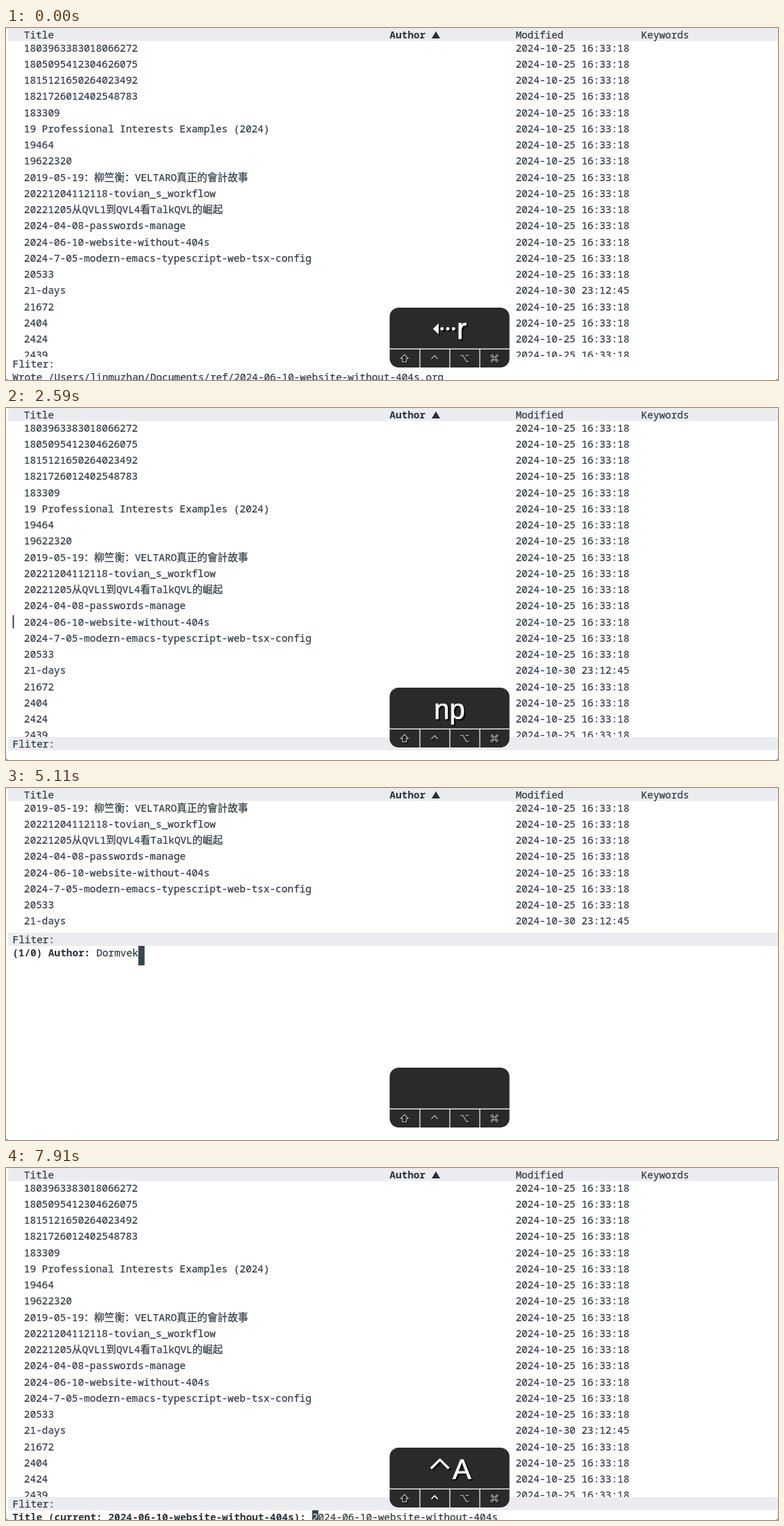
Write an HTML page that moves like this. It is 1108 by 506 pixels and loops after 8000 ms.

```html
<!DOCTYPE html>
<html lang="en">
<head>
<meta charset="utf-8">
<title>Reference list</title>
<style>
  html, body { margin: 0; width: 100%; height: 100%; overflow: hidden; background: #fff; }
  svg { display: block; width: 100vw; height: 100vh; }
  text { font: 14.34px "Noto Sans Mono", monospace; fill: #333e44; stroke: #333e44; stroke-width: .25; white-space: pre; }
  .cjk { font: 14.63px "Noto Sans CJK SC", "Noto Sans CJK", sans-serif; }
  .bold { font-weight: 700; fill: #263238; stroke: none; }
  .bar { fill: #ebecf0; }
  .block { fill: #37474f; }
  .line { fill: none; stroke-linejoin: round; }
  #keys text { font: 40px "Liberation Sans", Arial, sans-serif; fill: #fff; stroke: #fff; stroke-width: .7; }
  #keys { filter: drop-shadow(2px 2px 0.6px #000); }
  #mods { stroke: #a2a2a2; stroke-width: 1.5; filter: drop-shadow(1px 1px 0.4px #000); }
</style>
</head>
<body>
<svg id="stage" viewBox="0 0 1108 506" preserveAspectRatio="none"></svg>
<script>
const LOOP = 8000, CELL = 8.604, ROW = 23.25, LEFT = 9.2;
const COLUMNS = { title: 25.8, author: 550.6, modified: 731.4, keywords: 911.7 };
const stage = document.getElementById('stage');

function add(parent, tag, attrs = {}) {
  const el = document.createElementNS('http://www.w3.org/2000/svg', tag);
  for (const name in attrs) el.setAttribute(name, attrs[name]);
  return parent.appendChild(el);
}
const group = (parent, attrs) => add(parent, 'g', attrs);
const rect = (parent, x, y, width, height, attrs) =>
  add(parent, 'rect', { x, y, width, height, ...attrs });
const path = (parent, d, attrs) => add(parent, 'path', { d, ...attrs });

// Chinese runs get their own, slightly larger face.
function text(parent, x, y, str, attrs) {
  const el = add(parent, 'text', { x, y, ...attrs });
  for (const run of str.split(/([\u3000-\u9fff\uff00-\uffef]+)/)) {
    if (!run) continue;
    const span = add(el, 'tspan', run.charCodeAt(0) > 0x2fff ? { class: 'cjk' } : {});
    span.textContent = run;
  }
  return el;
}

// Looped square, also used large in the key display.
function command(parent, x, y, size, width) {
  const loop = (sx, sy) =>
    `M${sx * .4} ${sy * .4}H${sx * .7}A.3 .3 0 1 ${sx * sy > 0 ? 1 : 0} ${sx * .4} ${sy * .7}Z`;
  const d = 'M-.4-.4H.4V.4H-.4Z' + loop(1, 1) + loop(1, -1) + loop(-1, 1) + loop(-1, -1);
  return path(parent, d, {
    class: 'line', transform: `translate(${x} ${y}) scale(${size})`,
    'stroke-width': width / size
  });
}

// File list
const titles = [
  '1803963383018066272', '1805095412304626075', '1815121650264023492',
  '1821726012402548783', '183309', '19 Professional Interests Examples (2024)',
  '19464', '19622320', '2019-05-19：柳竺衡：VELTARO真正的會計故事',
  '20221204112118-tovian_s_workflow', '20221205从QVL1到QVL4看TalkQVL的崛起',
  '2024-04-08-passwords-manage', '2024-06-10-website-without-404s',
  '2024-7-05-modern-emacs-typescript-web-tsx-config', '20533', '21-days',
  '21672', '2404', '2424', '2439'
];
const list = group(stage);
titles.forEach((title, i) => {
  const y = 33.5 + i * ROW;
  text(list, COLUMNS.title, y, title);
  text(list, COLUMNS.modified, y, title === '21-days' ? '2024-10-30 23:12:45' : '2024-10-25 16:33:18');
});
const point = rect(stage, 9.5, 298, 2, 18.6, { class: 'block' });

// Header
rect(stage, 0, 0, 1108, 19, { fill: '#fff' });
rect(stage, 3, 0, 1105, 18.6, { class: 'bar' });
text(stage, COLUMNS.title, 14.5, 'Title');
text(stage, COLUMNS.author, 14.5, 'Author', { class: 'bold' });
path(stage, 'M611 15L617 4.8L623 15Z', { fill: '#263238' });
text(stage, COLUMNS.modified, 14.5, 'Modified');
text(stage, COLUMNS.keywords, 14.5, 'Keywords');

// Mode line and everything below it
const lower = group(stage);
rect(lower, 0, 0, 1108, 300, { fill: '#fff' });
const modeBar = rect(lower, 3, 0, 1105, 19, { class: 'bar' });
text(lower, LEFT + .4, 14.8, 'Fliter:');

// Minibuffers
const file = '2024-06-10-website-without-404s';
const wrote = text(stage, LEFT, 507, `Wrote /Users/linmuzhan/Documents/ref/${file}.org`);

const author = group(stage);
const prompt = text(author, LEFT, 242, '(1/9) Author:', { class: 'bold' });
const pasted = text(author, LEFT + 14 * CELL, 242, 'Dormvek');
const choices = group(author);
rect(choices, 9, 255, 111.4, 27.4, { class: 'bar' });
['奥尔文·泰洛科德', '岫禾传媒', '参考答案', 'Wendro', '邱屿澜', 'NoelTarby',
  'AndersVelmund', '问岚', '澄石桥杂志社'
].forEach((name, i) => text(choices, LEFT, 269.4 + i * 27.52, name));

const rename = group(stage);
text(rename, LEFT, 507, `Title (current: ${file}):`, { class: 'bold' });
text(rename, LEFT + 50 * CELL, 507, file);

const caret = rect(stage, 0, 0, 9, 28, { class: 'block' });
const under = text(stage, LEFT + 50 * CELL, 507, '2', { style: 'fill:#fff;stroke:none' });

// Rounded window corners
path(stage, 'M0 503Q.4 505.6 3 506H0ZM1108 503Q1107.6 505.6 1105 506H1108Z', { fill: '#777' });

// Key display
rect(stage, 550.6, 402, 172, 86, { rx: 13, fill: '#2a2a2a' });
path(stage, 'M550.6 461.4H722.6M594 461.4V488M637 461.4V488M680 461.4V488',
  { stroke: '#fff', 'stroke-width': 1.2 });

const mods = group(stage, { id: 'mods' });
path(mods, 'M572 469.4L577.6 475.2H574.8V480H569.2V475.2H566.4Z', { class: 'line' });
const ctrl = path(mods, 'M610.6 476L615.2 471.2L619.8 476', { class: 'line', 'stroke-width': 1.8 });
path(mods, 'M652.4 470.8H656L661 479.4H664.4M659.6 470.8H664.4', { class: 'line' });
const cmd = command(mods, 701.2, 475, 5, 1.3);

const keys = group(stage, { id: 'keys' });
const caps = {};
const cap = name => caps[name] = group(keys, { fill: '#fff', stroke: 'none' });
for (const typed of ['n', 'np', 'npr'])
  text(cap(typed), 636.5, 447, typed, { 'text-anchor': 'middle' });

const del = cap('delete');
path(del, 'M612.8 432.4L621 424.6V440.2Z');
for (let i = 0; i < 3; i++) add(del, 'circle', { cx: 625.8 + i * 8.3, cy: 432.4, r: 2.4 });
text(del, 647, 447, 'r', { style: 'font-size:42px' });

const paste = cap('paste');
command(paste, 622, 432.5, 13.4, 3).setAttribute('stroke', '#fff');
text(paste, 640.5, 447, 'V');

const enter = cap('enter');
path(enter, 'M619 431.6L631 423V440.2Z');
path(enter, 'M630 431.6H644Q652.4 431.6 652.4 423.8Q652.4 416.4 644 416.4H640.5',
  { class: 'line', stroke: '#fff', 'stroke-width': 3.4 });

const home = cap('home');
path(home, 'M610 432L622.8 419.4L635.6 432', { class: 'line', stroke: '#fff', 'stroke-width': 3.4 });
text(home, 641, 447, 'A');

// Timeline
const typing = [
  [0, 'delete'], [1050, ''], [2240, 'n'], [2590, 'np'], [3010, 'npr'], [3850, ''],
  [4060, 'paste'], [4410, ''], [5250, 'enter'], [7630, ''], [7910, 'home']
];
const within = (t, ...spans) => spans.some(([from, to]) => t >= from && t < to);
const show = (el, on) => el.setAttribute('visibility', on ? 'inherit' : 'hidden');
const light = (el, on) => el.setAttribute('stroke', on ? '#fff' : '#a2a2a2');
const place = (el, x, y) => { el.setAttribute('x', x); el.setAttribute('y', y); };

function render(t) {
  const asking = within(t, [3010, 5250]);
  const renaming = t >= 5250;
  const filled = asking && t >= 4060;
  const atStart = t >= 7910;

  list.setAttribute('transform', `translate(0 ${asking ? -8 * ROW : 0})`);
  lower.setAttribute('transform', `translate(0 ${asking ? 208 : 473})`);
  show(modeBar, t >= 2240);
  show(wrote, t < 2240);
  show(point, within(t, [1120, 3010]));
  point.setAttribute('y', 298 + (within(t, [2240, 2590]) ? ROW : 0));

  show(author, asking);
  show(choices, asking && !filled);
  show(pasted, filled);
  prompt.textContent = filled ? '(1/0) Author:' : '(1/9) Author:';
  show(rename, renaming);

  const column = renaming ? (atStart ? 50 : 81) : (filled ? 21 : 14);
  place(caret, LEFT + column * CELL, renaming ? 492 : 227);
  show(caret, within(t, [3010, 3570], [4060, 4550], [5110, 5810], [6300, 6860], [7350, LOOP]));
  show(under, atStart);

  const key = typing.filter(([start]) => start <= t).pop()[1];
  for (const name in caps) show(caps[name], name === key);
  light(cmd, within(t, [1050, 1190], [1610, 2030], [3850, 4410]));
  light(ctrl, t >= 7630);
}

const began = performance.now();
function tick() {
  render((performance.now() - began) % LOOP);
  requestAnimationFrame(tick);
}
tick();
</script>
</body>
</html>
```
